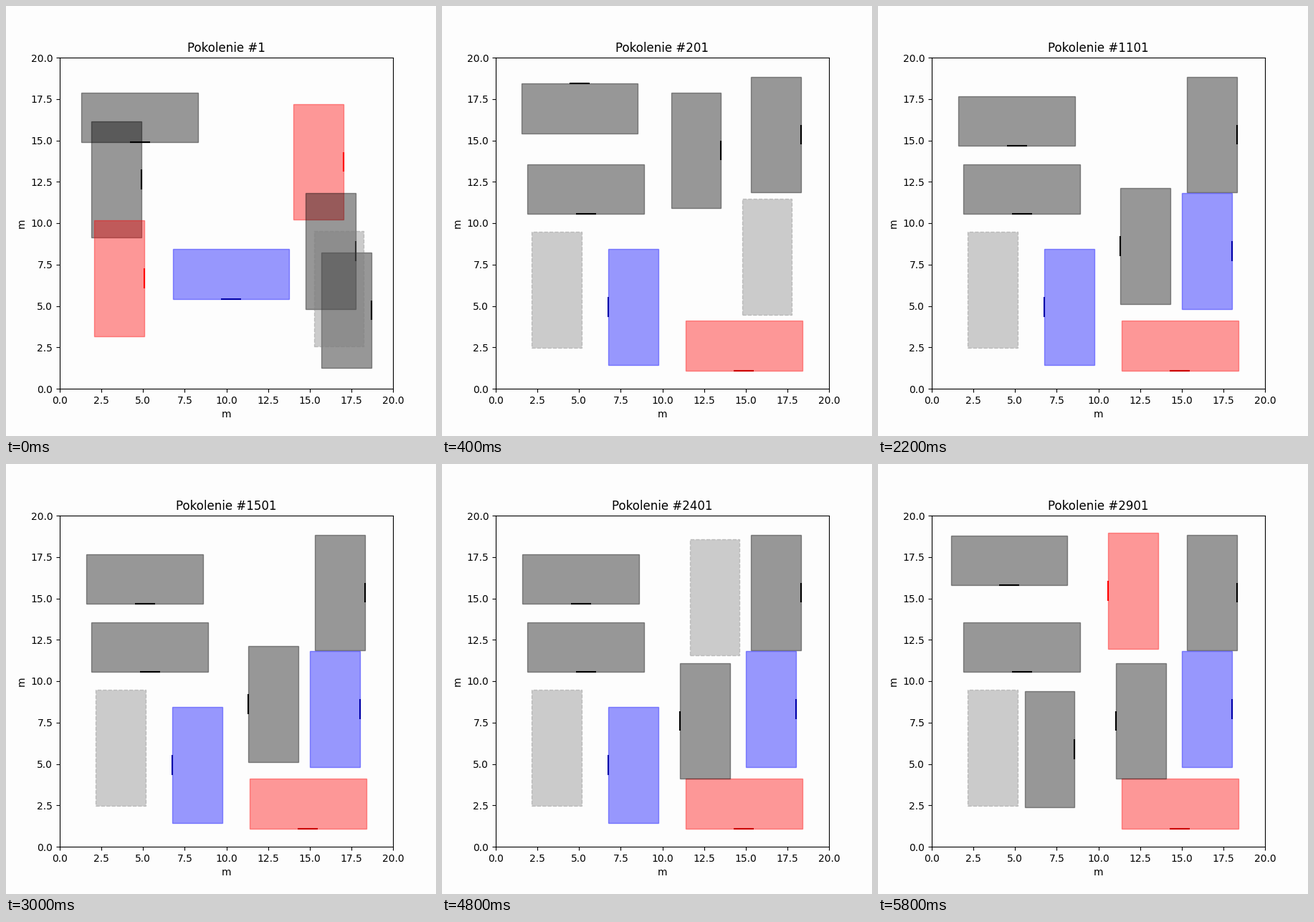
Recreate the animation shown at these times as a matplotlib script. Size 600 px wide and 600 px high, loop 6000 ms.

```python
import matplotlib.pyplot as plt
from matplotlib.animation import FuncAnimation
from matplotlib.patches import Rectangle

FRAMES, INTERVAL = 30, 200
LONG, SHORT, DOOR = 7, 3, 1.2
PAPER = "#fdfdfd"
DOOR_COLORS = {"black": "black", "blue": "#0000a8", "red": "red"}


def item(x, y, side=None, color="black", wide=None):
    """A 7 x 3 m block; `side` is the edge holding its door."""
    if wide is None:
        wide = side in ("top", "bottom")
    return x, y, side, color, wide


def shade(x, y):
    """A dashed block without a door."""
    return item(x, y, color="gray")


START = [
    item(1.30, 14.90, "bottom"),
    item(1.90, 9.15, "right"),
    item(2.08, 3.18, "right", "red"),
    item(6.78, 5.43, "bottom", "blue"),
    item(14.04, 10.20, "right", "red"),
    item(14.76, 4.80, "right"),
    item(15.70, 1.24, "right"),
    shade(15.25, 2.54),
]

# For each slot: (first step, block)
SLOTS = [
    [(1, item(1.53, 15.43, "top")), (7, item(1.61, 14.66, "bottom")),
     (28, item(1.14, 15.80, "bottom"))],
    [(1, item(1.91, 10.56, "bottom"))],
    [(1, shade(2.15, 2.47))],
    [(1, item(6.76, 1.42, "left", "blue")), (26, item(5.57, 2.40, "right"))],
    [(1, item(11.40, 1.10, "bottom", "red"))],
    [(1, item(15.31, 11.85, "right"))],
    [(1, item(10.52, 10.90, "right")), (5, item(11.33, 5.12, "left")),
     (20, item(11.06, 4.10, "left"))],
    [(1, shade(14.78, 4.48)), (5, shade(14.65, 4.71)),
     (10, item(15.03, 4.80, "right", "blue"))],
    [(23, shade(11.64, 11.55)), (27, item(10.60, 11.94, "left", "red"))],
]


def layout(step):
    if step == 0:
        return START
    current = []
    for slot in SLOTS:
        past = [block for first, block in slot if first <= step]
        current += past[-1:]
    return current


def draw_block(block, z):
    x, y, side, color, wide = block
    w, h = (LONG, SHORT) if wide else (SHORT, LONG)
    style = "--" if color == "gray" else "-"
    artists = [ax.add_patch(Rectangle((x, y), w, h, fc=color, ec=color,
                                      ls=style, alpha=0.4, zorder=z))]
    if side:
        cx, cy, d = x + w / 2, y + h / 2, DOOR / 2
        if wide:
            edge = y + h if side == "top" else y
            xs, ys = (cx - d, cx + d), (edge, edge)
        else:
            edge = x + w if side == "right" else x
            xs, ys = (edge, edge), (cy - d, cy + d)
        tone = "#cc0000" if wide and color == "red" else DOOR_COLORS[color]
        artists += ax.plot(xs, ys, color=tone, lw=1.5, zorder=z,
                           solid_capstyle="butt")
    return artists


fig, ax = plt.subplots(figsize=(6, 6), dpi=100, facecolor=PAPER)
ax.set_facecolor(PAPER)
ax.set(xlim=(0, 20), ylim=(0, 20), xlabel="m", ylabel="m")
shown = []


def update(step):
    while shown:
        shown.pop().remove()
    for k, block in enumerate(layout(step)):
        shown.extend(draw_block(block, 1 + k / 20))
    ax.set(xlim=(0, 20), ylim=(0, 20))
    ax.set_title(f"Pokolenie #{100 * step + 1}")
    return shown


anim = FuncAnimation(fig, update, frames=FRAMES, interval=INTERVAL,
                     repeat=True, repeat_delay=0, blit=False)
plt.show()
```
